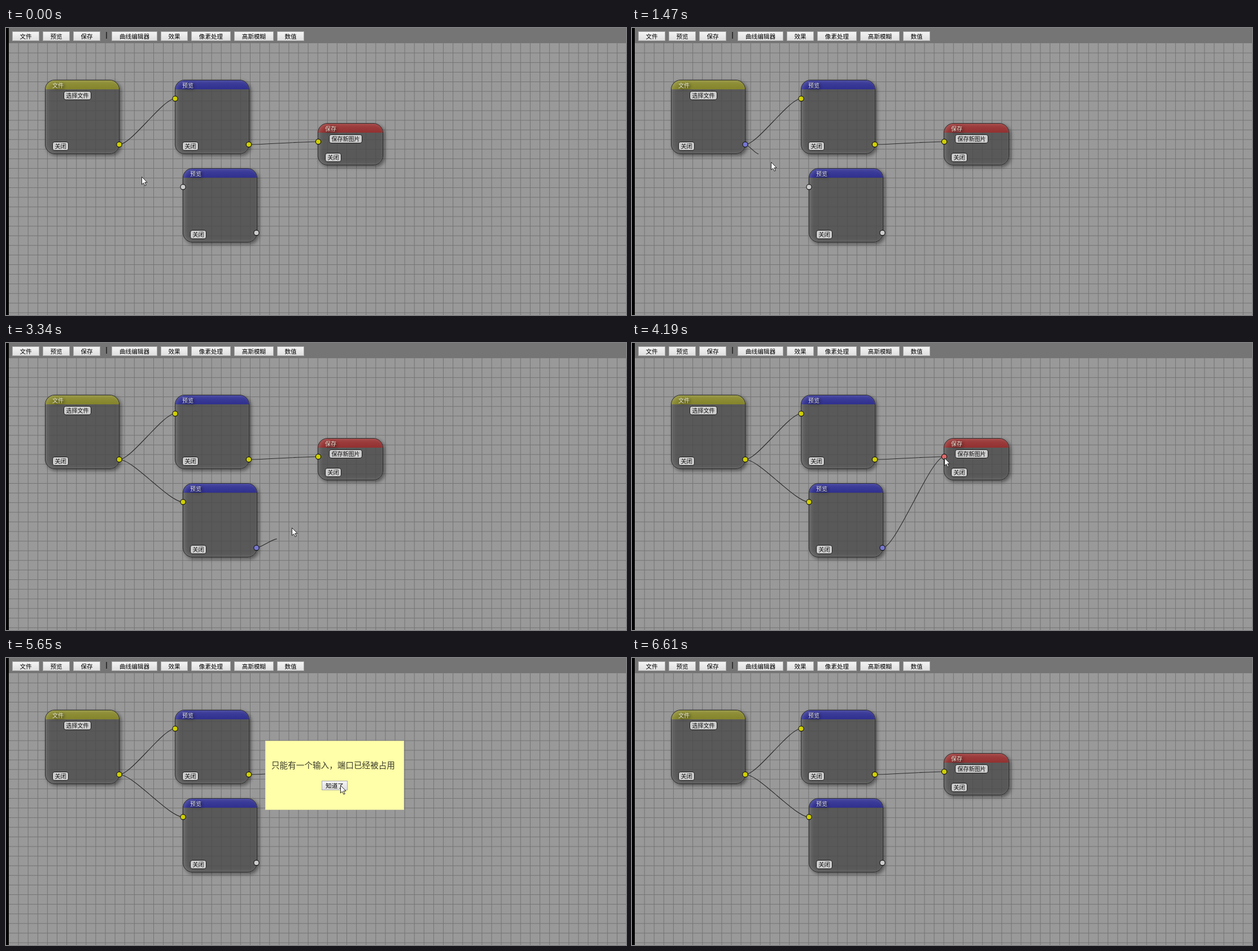
An HTML page with a canvas that plays this animation: 1098 px wide and 510 px high, repeating every 6.76 s.

```html
<!DOCTYPE html>
<html>
<head>
<meta charset="utf-8">
<title>Node editor</title>
<style>
html, body { margin: 0; width: 100%; height: 100%; overflow: hidden; background: #999; }
body { position: relative; font: 10px/1 "Noto Sans CJK SC", "Noto Sans CJK", sans-serif; color: #111; }
canvas, svg { position: absolute; left: 0; top: 0; }
.bar { position: absolute; left: 5px; top: 0; right: 0; height: 27px; background: #757575; }
.sep { position: absolute; left: 177px; top: 7px; width: 2px; height: 12px; background: #333; }
.btn, .pill, .node, .dialog, .msg { position: absolute; box-sizing: border-box; white-space: nowrap; }
.btn {
  height: 17px; border: 1px solid #aaa; font-size: 10.6px; line-height: 15px; text-align: center;
  background: linear-gradient(#f4f4f4, #dedede); color: #000;
}
.node {
  border: 1px solid #2c2c2c; border-radius: 17px; overflow: hidden;
  background: rgba(70, 70, 70, .76);
  box-shadow: 3px 3px 6px rgba(0, 0, 0, .45);
}
.node::after {
  content: ""; position: absolute; inset: 0; border-radius: 16px;
  box-shadow: inset 3px 0 7px rgba(255, 255, 255, .16);
}
.head {
  height: 16px; padding-left: 12px; line-height: 18px; color: #e6e6d8;
  text-shadow: 2px 2px 5px rgba(0, 0, 0, .8);
}
.pill {
  height: 16px; border: 1px solid #1a1a1a; border-radius: 4px; background: #ccc;
  line-height: 14px; text-align: center; color: #111;
}
.dialog {
  left: 459px; top: 147px; width: 246px; height: 123px;
  background: #ffffa9; border: 1px solid #e4e4a0;
}
.msg { left: 10px; top: 34px; font-size: 14.6px; line-height: 16px; color: #3a3a2c; font-weight: 300; }
</style>
</head>
<body>
<canvas id="grid" width="1098" height="510"></canvas>
<div class="bar" id="bar"></div>
<div class="sep"></div>
<div id="nodes"></div>
<svg width="1098" height="510">
  <g id="wires" fill="none" stroke="#2b2b2b" stroke-width="1.1"></g>
  <g id="ports" stroke="#151515" stroke-width="1.1"></g>
</svg>
<div class="dialog" id="dialog">
  <div class="msg">只能有一个输入，端口已经被占用</div>
  <div class="btn" style="left:99px;top:70px;width:46px">知道了</div>
</div>
<svg width="1098" height="510">
  <path id="cursor" d="M.5 .5V14L3.6 11.2L6 16.3L8.2 15.3L5.8 10.3H10Z" fill="#fff" stroke="#222" stroke-width="1"/>
</svg>
<script>
const LOOP = 6760;
const $ = id => document.getElementById(id);

function add(parent, cls, text, x, y, w) {
  const el = document.createElement('div');
  el.className = cls;
  el.textContent = text;
  el.style.cssText = `left:${x}px;top:${y}px;width:${w}px`;
  parent.append(el);
  return el;
}

function svg(parent, tag, attrs) {
  const el = document.createElementNS('http://www.w3.org/2000/svg', tag);
  for (const k in attrs) el.setAttribute(k, attrs[k]);
  parent.append(el);
  return el;
}

// Background grid
const ctx = $('grid').getContext('2d');
ctx.fillStyle = '#999';
ctx.fillRect(0, 0, 1098, 510);
ctx.fillStyle = '#747474';
for (let d = 17.1; d < 1093; d += 17.1) {
  ctx.fillRect(4.5 + d, 27, 1, 483);
  ctx.fillRect(5, 26.7 + d, 1093, 1);
}
ctx.fillStyle = '#000';
ctx.fillRect(0, 0, 5, 510);

// Toolbar: button width follows the label length
function toolbar(x, labels) {
  for (const text of labels.split(' ')) {
    const w = 25.6 + 11 * text.length;
    add($('bar'), 'btn', text, Math.round(x) - 5, 6, Math.round(w));
    x += w + 6.4;
  }
}
toolbar(11, '文件 预览 保存');
toolbar(187, '曲线编辑器 效果 像素处理 高斯模糊 数值');

// Nodes
function node(title, color, x, y, w, h, action) {
  const el = add($('nodes'), 'node', '', x, y, w);
  el.style.height = h + 'px';
  const head = add(el, 'head', title, 0, 0, w);
  head.style.background = `linear-gradient(rgba(255,255,255,.07), rgba(0,0,0,.05)), ${color}`;
  if (action) {
    const aw = 9 + 10 * action.length;
    add(el, 'pill', action, Math.floor((w - aw) / 2 - 9), 19, aw);
  }
  add(el, 'pill', '关闭', 12, h - 23, 29);
}
node('文件', '#8b8b2e', 69, 92, 132, 132, '选择文件');
node('预览', '#323296', 299, 92, 132, 132);
node('预览', '#323296', 313, 249, 132, 132);
node('保存', '#9a3333', 552, 169, 116, 75, '保存新图片');

// Ports and wires
const GREY = '#ccc', YELLOW = '#cfcf00', BLUE = '#7676d2', GREEN = '#58cc6c', RED = '#e06a6a';
const fileOut = [200.5, 207], viewIn = [299.5, 125.5], viewOut = [430, 207];
const copyIn = [313.5, 282.5], copyOut = [443.5, 364], saveIn = [553, 202];

const port = ([cx, cy]) => svg($('ports'), 'circle', { cx, cy, r: 4.6, fill: YELLOW });
const [pFile, , , pCopyIn, pCopyOut, pSave] = [fileOut, viewIn, viewOut, copyIn, copyOut, saveIn].map(port);

function curve([x0, y0], [x1, y1]) {
  const d = (x1 - x0) * 0.22;
  return `M${x0} ${y0}C${x0 + d} ${y0} ${x1 - d} ${y1} ${x1} ${y1}`;
}
const wire = (a, b) => svg($('wires'), 'path', { d: curve(a, b) });
wire(fileOut, viewIn);
wire(viewOut, saveIn);
const wireCopy = wire(fileOut, copyIn);
const wireSave = wire(copyOut, saveIn);

// The screen refreshes in bursts of evenly spaced updates
const ticks = [0];
function burst(from, to, n) {
  for (let i = 0; i < n; i++) ticks.push(Math.floor(from + (to - from) * i / Math.max(1, n - 1)));
}
burst(150, 1050, 8);
burst(1200, 2140, 8);
burst(2410, 3340, 8);
burst(3490, 4190, 6);
burst(4620, 4620, 1);
burst(4930, 5920, 8);
burst(6070, 6610, 5);

// Pointer stops: arrival time, travel time, place
const stops = [
  [900, 850, 200, 208],
  [2000, 950, 312, 282],
  [3050, 800, 446, 374],
  [3340, 290, 506, 328],
  [4050, 710, 553, 204],
  [5630, 850, 592, 226],
  [5920, 220, 669, 327],
  [6610, 690, 1130, 520]
];

function pointer(t) {
  let x = 240, y = 264;
  for (const [end, span, px, py] of stops) {
    const k = Math.min(1, Math.max(0, (t - end + span) / span));
    const e = k * k * (3 - 2 * k);
    x += (px - x) * e;
    y += (py - y) * e;
  }
  return [x, y];
}

const fill = (el, color) => el.setAttribute('fill', color);
const show = (el, on) => { el.style.visibility = on ? 'visible' : 'hidden'; };

function draw(time) {
  const i = ticks.findLastIndex(tick => tick <= time);
  const t = ticks[i];
  const lag = pointer(ticks[Math.max(0, i - 1)]);
  const within = (a, b) => t >= a && t < b;
  const [x, y] = pointer(t);

  $('cursor').setAttribute('transform', `translate(${Math.round(x)} ${Math.round(y)})`);

  // A dragged wire trails the pointer by one update
  show(wireCopy, t >= 1200);
  wireCopy.setAttribute('d', curve(fileOut, t < 2140 ? lag : copyIn));
  show(wireSave, within(3207, 4620));
  wireSave.setAttribute('d', curve(copyOut, t < 4190 ? lag : saveIn));

  fill(pFile, within(1050, 2410) ? BLUE : YELLOW);
  fill(pCopyIn, t < 2005 ? GREY : t < 2410 ? GREEN : YELLOW);
  fill(pCopyOut, within(3074, 4620) ? BLUE : GREY);
  fill(pSave, within(4050, 4620) ? RED : YELLOW);
  show($('dialog'), within(4620, 5778));
}

let start;
function frame(now) {
  start ??= now;
  draw((now - start) % LOOP);
  requestAnimationFrame(frame);
}
draw(0);
requestAnimationFrame(frame);
</script>
</body>
</html>
```
